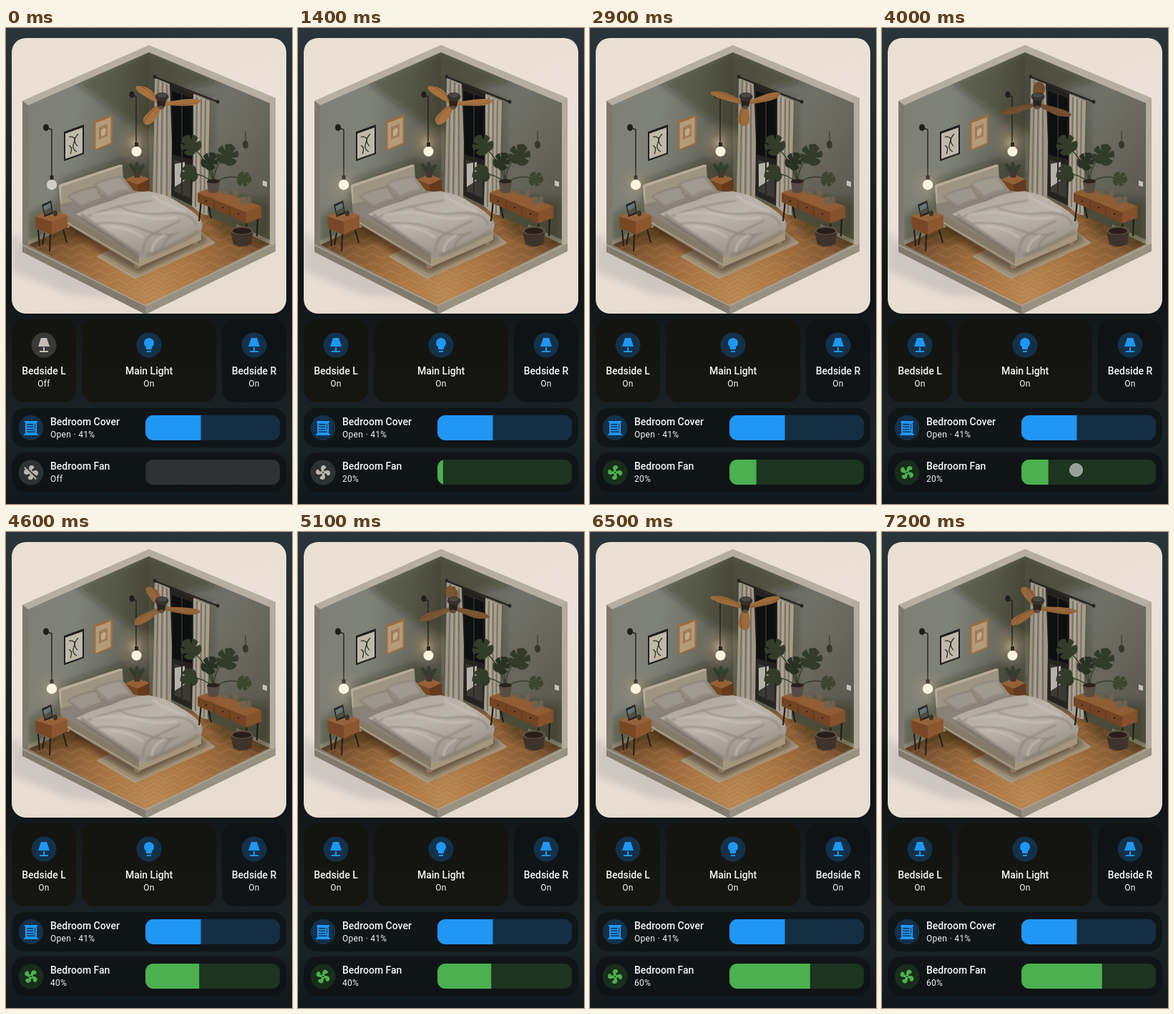
An HTML page for the animation above (7.3 s loop, 400x665 px).

```html
<!DOCTYPE html>
<html lang="en">
<head>
<meta charset="utf-8">
<title>Bedroom dashboard</title>
<style>
html, body { margin: 0; width: 100%; height: 100%; overflow: hidden; background: #11181c; }
svg { display: block; width: 100vw; height: 100vh; }
text { font-family: Roboto, Arial, sans-serif; fill: #f4f4f2; }
.title { font-size: 14px; font-weight: 500; }
.state { font-size: 12px; letter-spacing: .3px; }
.mid { text-anchor: middle; }
.card { fill: #0e1214; fill-opacity: .8; }
.warm { fill: #141510; fill-opacity: .85; }
.disc { fill: #14314a; }
.blue { fill: #2196f3; }
.dark { stroke: #26221f; fill: none; }
.dim { filter: brightness(.82) sepia(.12); }
</style>
</head>
<body>
<svg viewBox="0 0 400 665" preserveAspectRatio="none">
<defs>
  <linearGradient id="page" x2="0" y2="1">
    <stop offset="0" stop-color="#2a353b"/><stop offset=".3" stop-color="#1c2428"/>
    <stop offset=".55" stop-color="#101517"/><stop offset=".72" stop-color="#181e21"/>
    <stop offset=".85" stop-color="#1b2429"/><stop offset="1" stop-color="#11181d"/>
  </linearGradient>
  <linearGradient id="paper" x2=".3" y2="1">
    <stop offset="0" stop-color="#e9dfd3"/><stop offset=".5" stop-color="#ebe1d6"/><stop offset="1" stop-color="#e6dccf"/>
  </linearGradient>
  <linearGradient id="wallL" x2="1" y2=".25">
    <stop offset="0" stop-color="#7f8176"/><stop offset=".45" stop-color="#7f8277"/>
    <stop offset=".75" stop-color="#6d6f64"/><stop offset="1" stop-color="#56574d"/>
  </linearGradient>
  <linearGradient id="wallR" x2=".8" y2="1">
    <stop offset="0" stop-color="#5f6056"/><stop offset=".45" stop-color="#717267"/><stop offset="1" stop-color="#5a574b"/>
  </linearGradient>
  <radialGradient id="floor" gradientUnits="userSpaceOnUse" cx="205" cy="372" r="190">
    <stop offset="0" stop-color="#bb8a56"/><stop offset=".4" stop-color="#a87443"/>
    <stop offset=".75" stop-color="#835a35"/><stop offset="1" stop-color="#5f4027"/>
  </radialGradient>
  <linearGradient id="quilt" x2=".6" y2="1">
    <stop offset="0" stop-color="#c9c3ba"/><stop offset=".5" stop-color="#dcd7d0"/><stop offset="1" stop-color="#b3aca1"/>
  </linearGradient>
  <radialGradient id="halo">
    <stop offset="0" stop-color="#ffe0b0" stop-opacity=".8"/><stop offset=".4" stop-color="#d8a874" stop-opacity=".35"/>
    <stop offset="1" stop-color="#c89868" stop-opacity="0"/>
  </radialGradient>
  <pattern id="planks" width="26" height="12" patternUnits="userSpaceOnUse">
    <path d="M0 0L13 7L26 0V5L13 12L0 5Z" fill="#d39a5c" opacity=".12"/>
    <path d="M0 0L13 7L26 0M0 6L13 13L26 6" fill="none" stroke="#5d3514" stroke-width=".6" opacity=".25"/>
  </pattern>
  <filter id="soft" x="-50%" y="-50%" width="200%" height="200%"><feGaussianBlur stdDeviation="5"/></filter>
  <filter id="fine" x="-20%" y="-20%" width="140%" height="140%"><feGaussianBlur stdDeviation="1.200"/></filter>
  <clipPath id="frame"><rect x="8" y="14" width="384" height="385" rx="20"/></clipPath>
  <clipPath id="room"><path d="M31 108L200 34L369 105V302L195 388L31 303Z"/></clipPath>
  <clipPath id="bar1"><rect x="195" y="541" width="188" height="35" rx="11"/></clipPath>
  <clipPath id="bar2"><rect x="195" y="603" width="188" height="35" rx="11"/></clipPath>
  <path id="leaf" d="M0 13C-7 17-15 11-15 3L-7 2L-15-1C-15-5-13-8-11-10L-5-4L-8-12C-5-14-2-15 0-16
    C3-15 6-13 8-12L5-4L11-10C14-7 15-4 15-1L7 2L15 4C15 11 7 17 0 13Z"/>
  <path id="lamp" d="M8,2H16L20,14H4L8,2M11,15H13V20H18V22H6V20H11V15Z"/>
  <path id="bulb" d="M12,2A7,7 0 0,0 5,9C5,11.380 6.190,13.470 8,14.740V17A1,1 0 0,0 9,18H15A1,1 0 0,0 16,17V14.740C17.810,13.470 19,11.380 19,9A7,7 0 0,0 12,2M9,21A1,1 0 0,0 10,22H14A1,1 0 0,0 15,21V20H9V21Z"/>
</defs>

<rect width="400" height="665" fill="url(#page)"/>

<g clip-path="url(#frame)">
  <rect x="8" y="14" width="384" height="386" fill="url(#paper)"/>
  <path d="M8 286L24 300L150 376L90 372L8 340Z" fill="#b5b1b0" opacity=".5" filter="url(#soft)"/>

  <!-- shell -->
  <path d="M23 102L200 24L377 98V311L195 400L23 312Z" fill="#a09a8c"/>
  <path d="M23 102L200 24L377 98L369 105L200 34L31 108Z" fill="#b6afa1"/>
  <path d="M23 102L31 108V304L23 308Z" fill="#7f796d"/>
  <path d="M377 98L369 105V302L377 306Z" fill="#b3ab9d"/>
  <path d="M31 108L200 34V226L31 304Z" fill="url(#wallL)"/>
  <path d="M200 34L369 105V304L200 228Z" fill="url(#wallR)"/>
  <path d="M31 303L200 224L369 302L195 388Z" fill="url(#floor)"/>
  <path d="M31 303L200 224L369 302L195 388Z" fill="url(#planks)"/>
  <path d="M31 297L80 275V281L31 303ZM369 296L322 274V280L369 302Z" fill="#9c9484"/>
  <g clip-path="url(#room)" fill="#1d1811" filter="url(#soft)">
    <path d="M96 76L200 32L300 74L240 86L200 150Z" opacity=".3"/>
    <path d="M31 300V262L74 240L76 212L165 182L200 200V240L100 300Z" opacity=".3"/>
    <path d="M258 226L369 240V310L300 290Z" opacity=".3"/>
    <path d="M205 70L290 100V260L200 230Z" opacity=".25"/>
  </g>
  <path d="M23 303L31 303L195 388V400L23 313Z" fill="#827b6d"/>
  <path d="M377 302L369 302L195 388V400L377 312Z" fill="#989080"/>
  <path d="M23 303L195 388L377 301" fill="none" stroke="#aca393" stroke-width="1.500"/>

  <!-- wall art -->
  <path d="M81 145L109 135V176L81 186Z" fill="#1f1e1c"/>
  <path d="M83 147.500L107 139V174.500L83 183Z" fill="#bfb9aa"/>
  <path d="M88 152Q99 151 95 160T99 173M101 148Q92 157 100 165M88 164Q94 167 90 176" class="dark" stroke-width="1.200"/>
  <path d="M123 130L149 121V162L123 172Z" fill="#9c6c40"/>
  <path d="M125.500 132.500L146.500 125V160.500L125.500 169Z" fill="#b49a7a"/>
  <path d="M130 138L142 134V151L130 156Z" fill="#9f7d5c"/>
  <path d="M133 143Q137 137 140 142L138 150L133 151Z" fill="#c0aa8b"/>

  <!-- window and curtains -->
  <path d="M227 77L264 92V250L231 234Z" fill="#25231f"/>
  <path d="M232 88L260 98V184L233 177Z" fill="#0e0f10"/>
  <path d="M235 184L258 192V238L236 228Z" fill="#3b3934"/>
  <path d="M236 190L250 187V213L236 222Z" fill="#b5b0a8"/>
  <path d="M246 92V232" stroke="#2b2925" stroke-width="2"/>
  <g class="dim">
    <path d="M208 70L229 78L232 160L231 244L218 241L205 233L207 150Z" fill="#b9b1a1"/>
    <path d="M262 92L285 102L283 190L282 262L270 258L260 249L262 170Z" fill="#c3bbac"/>
    <path d="M213 73L210 234M219 76L217 238M225 79L225 241M267 96L265 250M273 99L272 256M279 101L277 259" fill="none" stroke="#7d7567" stroke-width="2" opacity=".75"/>
    <path d="M216 75L214 236M222 78L221 240M270 98L268 254" fill="none" stroke="#dcd5c7" stroke-width="1.300" opacity=".7"/>
  </g>
  <path d="M207 68L296 103" class="dark" stroke-width="2.200"/>
  <circle cx="208" cy="68" r="2.500" fill="#26221f"/><circle cx="296" cy="103" r="2.500" fill="#26221f"/>

  <!-- right bedside table -->
  <circle cx="180" cy="160" r="32" fill="url(#halo)" opacity=".6"/>
  <g class="dim">
    <path d="M170 228V243M198 228V240" class="dark" stroke-width="2"/>
    <path d="M166 212L184 204L201 211L184 219Z" fill="#b8713b"/>
    <path d="M166 212L184 219V235L166 226Z" fill="#934f24"/><path d="M184 219L201 211V226L184 235Z" fill="#7d421f"/>
    <g fill="#3b4a31">
      <ellipse cx="177" cy="195" rx="3" ry="7" transform="rotate(-35 177 195)"/>
      <ellipse cx="183" cy="193" rx="3" ry="6"/><ellipse cx="189" cy="196" rx="3" ry="7" transform="rotate(40 189 196)"/>
    </g>
    <path d="M178 200H189L187 209H180Z" fill="#4b423a"/>
  </g>

  <!-- pendants -->
  <path d="M176 93L182 96V164M56 139L64 142V211" class="dark" stroke-width="1.400"/>
  <ellipse cx="176" cy="93" rx="3.500" ry="4.500" fill="#211e1c"/><ellipse cx="56" cy="139" rx="4" ry="4.800" fill="#211e1c"/>
  <path d="M180 160H185V167H180ZM61.500 206H66.500V213H61.500Z" fill="#2a2520"/>
  <circle cx="182.500" cy="172.500" r="7" fill="#fff3df"/>
  <circle id="glow" cx="64" cy="219" r="28" fill="url(#halo)"/>
  <circle id="globe" cx="64" cy="219" r="7.200"/>

  <!-- rug, bed -->
  <path d="M126 319L245 262L293 300L180 351Z" fill="#a6967c"/>
  <path d="M135 318L183 345L286 300M130 320L181 349L291 301" fill="none" stroke="#c6b99f" stroke-width="1" opacity=".5"/>
  <path d="M66 264L130 312L185 342L284 296L250 270Z" fill="#2e1a0a" opacity=".55" filter="url(#soft)"/>
  <g class="dim">
    <path d="M179 328H187V336H180ZM262 296H268V303H262ZM84 271H89V279H85Z" fill="#ae8d67"/>
    <path d="M74 222Q74 219 77 218L159 191Q163 190 163 194L165 236L78 266Z" fill="#bbb09e"/>
    <path d="M74 222Q74 219 77 218L159 191Q163 190 163 193L77 222L78 266Z" fill="#d8cdbc"/>
    <path d="M76 250L186 315V334L77 269Z" fill="#9f917e"/>
    <path d="M186 317L273 283V296L186 334Z" fill="#c3b298"/>
    <path d="M76 246L164 226L205 230L270 275L186 320L78 257Z" fill="#a39b8f"/>
    <path d="M76 266L186 331" stroke="#c9bca8" stroke-width="2"/>
    <path d="M85 236Q93 227 126 220Q134 232 140 243Q126 248 107 254Q95 243 85 236Z" fill="#a29c91"/>
    <path d="M88 235Q100 228 125 223L133 238Q118 241 106 248Z" fill="#b9b3a9" filter="url(#fine)"/>
    <path d="M122 218Q140 208 162 206Q170 215 179 228Q161 229 143 238Q133 228 122 218Z" fill="#a9a398"/>
    <path d="M126 218Q143 211 160 209L172 225Q154 226 143 234Z" fill="#beb8ae" filter="url(#fine)"/>
    <path d="M98 260Q122 248 146 242Q172 229 199 228Q224 231 243 245Q262 255 273 268Q277 276 272 285
      Q252 291 234 304Q217 315 196 321Q187 322 182 315Q160 299 138 285Q117 271 98 260Z" fill="url(#quilt)"/>
    <g fill="none" filter="url(#fine)">
      <path d="M104 262Q142 288 186 318" stroke="#8a8276" stroke-width="7" opacity=".5"/>
      <path d="M198 318Q236 304 270 284" stroke="#958c7f" stroke-width="6" opacity=".5"/>
      <path d="M114 263Q148 249 204 241M126 273Q165 270 190 281T236 288M156 248Q183 263 221 259T266 275M192 315Q190 296 207 287T244 269M218 308Q222 292 243 285" stroke="#938c82" stroke-width="2" opacity=".6"/>
      <path d="M120 261Q160 254 187 262T240 264M145 277Q176 280 192 293M205 234Q222 247 251 257M204 313Q204 298 222 289" stroke="#f0ece6" stroke-width="3" opacity=".6"/>
    </g>
  </g>

  <g class="dim">
    <!-- left bedside table -->
    <path d="M45 282L47 305M54 286L51 303M62 288L61 312M80 282L85 300" class="dark" stroke-width="2"/>
    <path d="M41 263L63 254L86 262L64 271Z" fill="#b8733e"/>
    <path d="M41 263L64 271V289L42 280Z" fill="#945328"/><path d="M64 271L86 262V278L64 289Z" fill="#ad6533"/>
    <path d="M50 247L63 241L66 259L54 264Z" fill="#26272a"/>
    <path d="M52 249L62 244L64 257L55 261Z" fill="#778992"/><path d="M53 256L63 250L64 257L55 261Z" fill="#5c5b50"/>
    <ellipse cx="69" cy="259" rx="3" ry="4" fill="#3f4036"/>

    <!-- console and plants -->
    <path d="M273 242L270 270M283 247L287 266M336 271L339 299M352 264L351 291" class="dark" stroke-width="2.200"/>
    <path d="M314 284Q330 276 346 283L343 302Q330 309 318 302Z" fill="#4b3e33"/>
    <ellipse cx="330" cy="283" rx="16" ry="6" fill="#74634f"/><ellipse cx="330" cy="283.500" rx="13" ry="4.500" fill="#2e241b"/>
    <path d="M268 230L288 223L357 249L336 258Z" fill="#b16d38"/>
    <path d="M268 230L336 258V273L268 243Z" fill="#8f4f26"/><path d="M336 258L357 249V265L336 273Z" fill="#a65f2e"/>
    <path d="M291 240V253M313 249V263" stroke="#6d3816"/>
    <path d="M279 242h2M302 251h2M324 260h2" stroke="#2f1c10" stroke-width="2"/>
    <g fill="none" stroke="#3f4d31" stroke-width="1.500">
      <path d="M290 216Q284 188 262 167M290 216Q292 190 307 180M289 216Q276 204 262 204M291 216Q312 203 329 211M290 214Q288 192 284 174"/>
    </g>
    <g fill="#3a4931">
      <use href="#leaf" transform="translate(258 163) rotate(-38) scale(.95)"/>
      <use href="#leaf" transform="translate(310 177) rotate(18)"/>
      <use href="#leaf" transform="translate(256 204) rotate(-105) scale(.82)"/>
      <use href="#leaf" transform="translate(285 186) rotate(30) scale(.75 .85)" fill="#2f3c29"/>
      <use href="#leaf" transform="translate(333 211) rotate(100) scale(.67)" fill="#465438"/>
    </g>
    <path d="M281 214Q290 210 299 214L297 229Q290 233 283 229Z" fill="#685c50"/>
    <ellipse cx="290" cy="214" rx="9" ry="3" fill="#302820"/>
    <g fill="#83735f">
      <rect x="317" y="226" width="8" height="9" rx="2"/><rect x="328" y="236" width="8" height="11" rx="2"/>
      <rect x="337" y="235" width="6" height="10" rx="2"/><rect x="303" y="227" width="7" height="6" rx="2"/>
    </g>
  </g>
  <path d="M335 144V158" class="dark" stroke-width=".8"/><ellipse cx="335" cy="163" rx="4" ry="5.500" fill="#39352f"/>
  <path d="M359 213L365 215V222L359 220Z" fill="#c9c1b4"/>

  <!-- ceiling fan -->
  <g transform="translate(217 106) scale(1 .56)"><g id="rotor"></g></g>
  <path d="M211 100H224L222 110Q217 113 212 110Z" fill="#29241f"/>
  <ellipse cx="218" cy="96" rx="9.500" ry="6" fill="#36322e"/><ellipse cx="218" cy="94" rx="7" ry="3" fill="#4b4640"/>
  <ellipse cx="217" cy="111" rx="4" ry="2.500" fill="#5d4c3b"/>
</g>

<!-- light cards -->
<rect class="card warm" x="8" y="407" width="90" height="116" rx="18"/>
<rect class="card warm" x="106" y="407" width="188" height="116" rx="18"/>
<rect class="card" x="302" y="407" width="90" height="116" rx="18"/>
<circle id="discL" cx="53" cy="443" r="17.500"/><use id="iconL" href="#lamp" x="41" y="431"/>
<circle class="disc" cx="200" cy="443" r="17.500"/><use class="blue" href="#bulb" x="188" y="431"/>
<circle class="disc" cx="347" cy="443" r="17.500"/><use class="blue" href="#lamp" x="335" y="431"/>
<text class="title mid" x="53" y="484">Bedside L</text><text id="stateL" class="state mid" x="53" y="501"></text>
<text class="title mid" x="200" y="484">Main Light</text><text class="state mid" x="200" y="501">On</text>
<text class="title mid" x="347" y="484">Bedside R</text><text class="state mid" x="347" y="501">On</text>

<!-- cover row -->
<rect class="card" x="8" y="531" width="384" height="55" rx="18"/>
<circle class="disc" cx="35" cy="558.500" r="17.500"/>
<path class="blue" transform="translate(23 547)" d="M3 2H21V4H20V20H22V22H2V20H4V4H3ZM6 6V7.500H15.500V6ZM6 9.500V11H15.500V9.500ZM6 13V14.500H15.500V13ZM6 16.500V18H18V16.500ZM17 6V14.500H18V6Z" fill-rule="evenodd"/>
<text class="title" x="62" y="555">Bedroom Cover</text><text class="state" x="62" y="572">Open · 41%</text>
<g clip-path="url(#bar1)"><rect x="195" y="541" width="188" height="35" fill="#142e44"/><rect class="blue" x="195" y="541" width="77.500" height="35"/></g>

<!-- fan row -->
<rect class="card" x="8" y="593.500" width="384" height="54.500" rx="18"/>
<circle id="discF" cx="35" cy="621" r="17.500"/>
<g transform="translate(35 621)">
  <path id="fanOn" d="M.5-10C5-10 5.110-6.430 2.750-5.250C1.760-4.760 1.320-3.710 1.130-2.780C1.610-2.580 2.030-2.270 2.350-1.870C6.050-3.870 10.030-3.080 10.030.5C10.030 5 6.460 5.100 5.280 2.730C4.780 1.740 3.720 1.300 2.790 1.110C2.590 1.590 2.280 2 1.880 2.340C3.870 6.030 3.080 10-.5 10C-5 10-5.090 6.420-2.730 5.240C-1.750 4.750-1.310 3.710-1.110 2.790C-1.600 2.590-2.030 2.270-2.350 1.870C-6.040 3.850-10 3.070-10-.5C-10-5-6.440-5.110-5.260-2.740C-4.760-1.750-3.710-1.320-2.780-1.130C-2.590-1.610-2.270-2.030-1.860-2.350C-3.850-6.040-3.060-10 .5-10ZM0-1A1 1 0 0 0 0 1A1 1 0 0 0 0-1Z" fill-rule="evenodd"/>
  <path id="fanOff" transform="translate(-12 -12)" fill="#bbb7b0" d="M12.500,2C9.640,2 8.570,4.550 9.290,7.470L15,13.160C15.870,13.370 16.810,13.810 17.280,14.730C18.460,17.100 22.030,17 22.030,12.500C22.030,8.920 18.050,8.130 14.350,10.130C14.030,9.730 13.610,9.420 13.130,9.220C13.320,8.290 13.760,7.240 14.750,6.750C17.110,5.570 17,2 12.500,2M3.280,4L2,5.270L4.470,7.730C3.220,7.740 2,8.870 2,11.500C2,15.070 5.960,15.850 9.650,13.870C9.970,14.270 10.400,14.590 10.890,14.790C10.690,15.710 10.250,16.750 9.270,17.240C6.910,18.420 7,22 11.500,22C13.800,22 14.940,20.360 14.940,18.210L18.730,22L20,20.720L3.280,4Z"/>
</g>
<text class="title" x="62" y="617">Bedroom Fan</text><text id="stateF" class="state" x="62" y="634"></text>
<g clip-path="url(#bar2)"><rect id="track" x="195" y="603" width="188" height="35"/><rect id="level" x="195" y="603" height="35" fill="#4caf50"/></g>

<circle id="tap" r="9" fill="#b9b9b6" stroke="#dcdcda" stroke-width="1"/>
</svg>

<script>
const LOOP = 7300, STEP = 100;
const $ = id => document.getElementById(id);
const set = (id, attrs) => { for (const k in attrs) $(id).setAttribute(k, attrs[k]); };

// [time, value] tables, linear between rows
const SPIN = [[1570, -5], [2900, 214], [4000, 395], [4700, 510], [5100, 628], [5800, 835], [6400, 1013], [7200, 1332], [7300, 1372]];
const ICON = [[1570, 0], [4300, 739], [6000, 1319], [7300, 1862]];
const LEVEL = [[1300, 0], [1400, 4.2], [1500, 15], [1600, 20], [4000, 20], [4100, 23.7], [4200, 35], [4300, 40],
  [5700, 40], [5800, 43.7], [5900, 55], [6000, 60]];
const PRESS = [[0, 0], [100, .8], [300, .8], [400, .4], [500, 0]];
const QUICK = [[0, 0], [100, .6], [200, .8], [300, .4], [400, 0]];
const TAPS = [[0, 53, 470, QUICK], [900, 232, 618, PRESS], [3700, 271.5, 617.5, PRESS], [5400, 324.5, 619, PRESS]];
const LABELS = [[0, 'Off'], [1400, '20%'], [4300, '40%'], [6000, '60%']];

function at(table, t) {
  const i = table.findIndex(row => row[0] > t);
  if (i === 0) return table[0][1];
  if (i < 0) return table[table.length - 1][1];
  const [t0, a] = table[i - 1], [t1, b] = table[i];
  return a + (b - a) * (t - t0) / (t1 - t0);
}
const last = (rows, t) => rows.filter(row => row[0] <= t).pop();
const mix = (a, b, k) => `rgb(${a.map((v, i) => Math.round(v + (b[i] - v) * k))})`;

$('rotor').innerHTML = [0, 120, 240].map(a =>
  `<path transform="rotate(${a})" d="M4 -4C18 -6 28 -9 42 -9Q56 -8 56 -2Q50 8 36 8Q20 7 4 4Z"/>
   <path transform="rotate(${a})" d="M8 2Q28 7 52 2" fill="none" stroke="#5b3a1e" stroke-opacity=".5"/>`).join('');

function draw(t) {
  const lit = t >= 300, fan = t >= 1400, on = t >= 1600;
  set('discL', { fill: lit ? '#14314a' : '#393937' });
  set('iconL', { fill: lit ? '#2196f3' : '#c3beb5' });
  set('globe', { fill: lit ? '#fff3df' : '#cfccc5' });
  set('glow', { opacity: lit ? .42 : 0 });
  $('stateL').textContent = lit ? 'On' : 'Off';

  set('discF', { fill: on ? '#182d1b' : '#2d3232' });
  set('fanOff', { opacity: fan ? 0 : 1 });
  set('fanOn', { opacity: fan ? 1 : 0, fill: on ? '#4caf50' : '#bbb7b0', transform: `rotate(${at(ICON, t)})` });
  set('track', { fill: fan ? '#1c3420' : '#2e3232' });
  set('level', { width: 188 * at(LEVEL, t) / 100 });
  $('stateF').textContent = last(LABELS, t)[1];

  // blades catch the light once per third of a turn
  const angle = at(SPIN, t);
  const shine = .5 + .5 * Math.cos((angle + 10) * 3 * Math.PI / 180);
  set('rotor', { transform: `rotate(${angle})`, fill: mix([104, 73, 47], [166, 114, 64], shine) });

  const [start, cx, cy, fade] = last(TAPS, t);
  set('tap', { cx, cy, opacity: at(fade, t - start) });
}

function tick() {
  const t = performance.now() % LOOP;
  draw(Math.floor(t / STEP) * STEP);
  requestAnimationFrame(tick);
}
tick();
</script>
</body>
</html>
```
